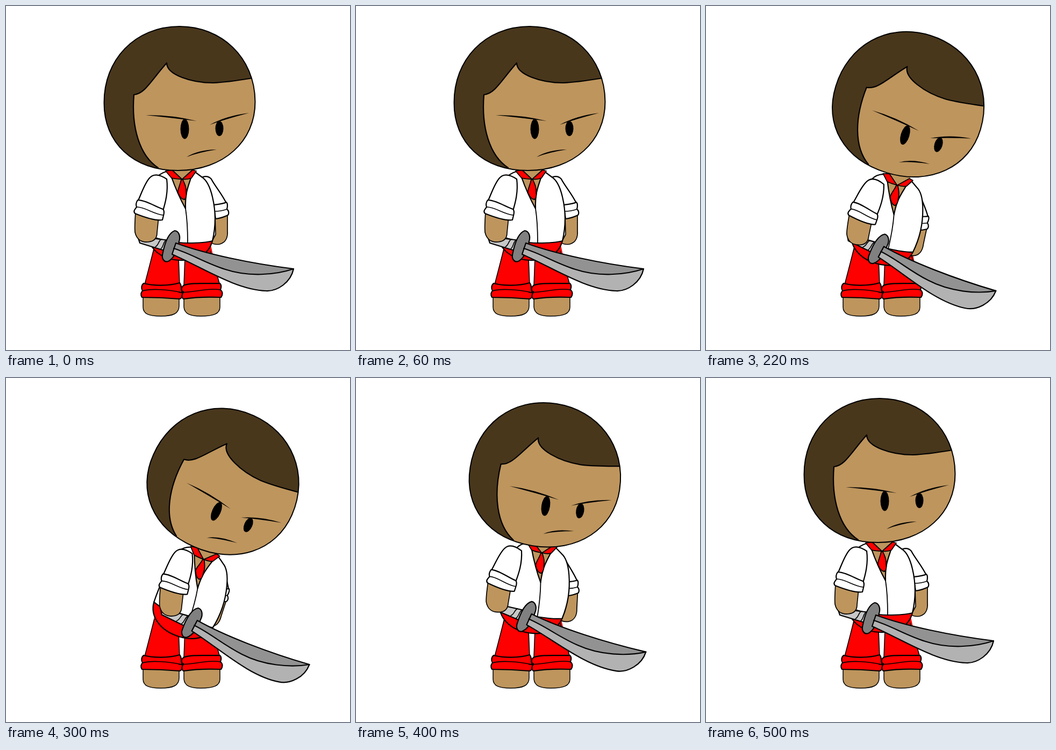
An HTML page with a canvas that plays this animation: 640x640 px, repeating every 0.6 s.

```html
<!DOCTYPE html>
<html lang="en">
<head>
<meta charset="utf-8">
<title>Swordsman idle</title>
<style>
html, body { margin: 0; width: 100%; height: 100%; overflow: hidden; background: #fff; }
canvas { display: block; width: 640px; height: 640px; }
</style>
</head>
<body>
<canvas id="stage" width="640" height="640"></canvas>
<script>
const ctx = document.getElementById('stage').getContext('2d');
const LOOP = 600;
const SKIN = '#be955d', HAIR = '#49371c', RED = '#ff0000', WHITE = '#ffffff', INK = '#000000';

// Joint of each part in the rest pose.
const pivots = {
  head: [332, 229],
  torso: [327, 323],
  nearArm: [266, 380],
  farArm: [412, 377],
  sword: [307, 447]
};

// Where each joint goes, then the turn in degrees.
const rest = {
  head: [332, 229, 0], torso: [327, 323, 0], nearArm: [266, 380, 0],
  farArm: [412, 377, 0], sword: [307, 447, 0]
};
const lean = {
  head: [370, 240, 17], torso: [355, 334, 13], nearArm: [292, 386, 6],
  farArm: [413, 403, 12], sword: [321, 452, 9.2]
};
const bow = {
  head: [391, 248, 24], torso: [367, 338, 18.5], nearArm: [312.5, 384, 1],
  farArm: [413, 404, 18], sword: [346, 455.5, 9.1]
};
const rise = {
  head: [352.5, 238, 9], torso: [345, 326, 9], nearArm: [271, 377, 4],
  farArm: [413, 388, 3], sword: [317, 444, 6]
};

function poseAt(t) {
  if (t < 100 || t >= 500) return rest;
  if (t < 300) return lean;
  return t < 400 ? bow : rise;
}

function fill(d, color) {
  ctx.fillStyle = color;
  ctx.fill(new Path2D(d));
}

function line(d, width = 2.2) {
  ctx.lineWidth = width;
  ctx.stroke(new Path2D(d));
}

function shape(d, color, width) {
  fill(d, color);
  line(d, width);
}

function eye(x, y, rx, ry) {
  ctx.beginPath();
  ctx.ellipse(x, y, rx, ry, 0, 0, Math.PI * 2);
  ctx.fillStyle = INK;
  ctx.fill();
}

// A curved stroke that thins out at both ends.
function taper(x0, y0, cx, cy, x1, y1, w) {
  fill(`M${x0} ${y0} Q${cx} ${cy - w} ${x1} ${y1} Q${cx} ${cy + w} ${x0} ${y0}Z`, INK);
}

function legs() {
  shape('M255 540 L255 560 C255 573 266 577 288 577 C311 577 322 572 322 558 L322 540Z', SKIN, 1.5);
  shape('M331 540 L331 560 C332 573 343 577 362 577 C386 577 398 573 398 560 L398 540Z', SKIN, 1.5);
  fill('M277 440 L258 520 L323 524 L321 465 L333 465 L331 524 L397 518 L380 440Z', RED);
  line('M276 449 L258 518', 1.6);
  line('M321 468 L323 520', 1.6);
  line('M333 468 L331 520', 1.6);
  line('M380 456 L397 516', 1.6);
  shape('M256 516 C275 521 303 521 323 515 C328 521 325 526 327 531 C330 538 327 544 323 545 C300 543 272 542 253 542 C250 537 251 533 254 530 C251 525 252 519 256 516Z', RED);
  line('M254 530 C270 525 306 528 327 533', 1.6);
  shape('M330 520 C345 514 374 517 398 516 C402 520 400 525 399 528 C404 532 403 538 400 542 C378 541 350 542 330 545 C325 541 328 536 330 532 C325 529 326 524 330 520Z', RED);
  line('M322 533 C350 533 378 524 399 528', 1.6);
}

function farArm() {
  shape('M389 392 L390 425 L382 440 C386 444 392 444 398 443 C409 440 413 430 412 418 L412 388Z', SKIN, 1.7);
  fill('M366 318 Q376 315 382 322 L411 370 L387 376Z', WHITE);
  line('M366 318 Q376 315 382 322 C388 334 402 350 410 367');
  shape('M386 370 C395 369 405 368 410 365 C413 368 412 374 411 378 C415 381 415 386 413 389 C405 393 397 395 390 396Z', WHITE);
  line('M411 378 C403 381 396 382 388 382', 1.6);
}

function torso() {
  shape('M265 427 C266 452 290 474 330 473 C355 472 377 464 384 437Z', RED);
  fill('M306 296 L349 296 L347 318 L334 380 L308 318Z', SKIN);
  shape('M298 308 C291 310 284 313 279 322 C270 355 265 390 265 427 C285 434 312 441 338 441 C357 441 373 440 384 437 C391 408 390 380 384 355 C380 338 374 324 364 318 L352 309 L345 317 C339 336 333 347 334 377 C324 359 317 344 307 316Z', WHITE);
  line('M334 377 C337 396 338 418 338 440', 1.8);
  shape('M326 323 C324 334 319 341 320 347 C323 356 328 360 332 360 C336 357 336 352 335 346 C336 335 331 329 329 323Z', RED, 1.8);
  shape('M297 307 L309 305 L327 322 C319 322 312 321 308 320Z', RED, 1.8);
  shape('M354 307 L347 305 L328 322 C336 323 341 322 345 320Z', RED, 1.8);
}

function grip() {
  shape('M245 429 L304 436 L298 456 L249 441Z', '#c8c8c8');
  line('M289 434 C283 437 285 444 278 448', 1.6);
  line('M298 435 C291 441 294 447 288 452', 1.6);
}

function blade() {
  shape('M314 418 C322 419 325 429 322 438 C319 455 312 470 302 475 C294 478 290 470 291 463 C294 447 300 423 314 418Z', '#808080');
  const edge = 'M316 441 C370 461 455 479 535 489';
  const belly = 'C530 514 505 531 484 530 C427 528 365 486 309 462';
  const ridge = 'C500 501 450 504 408 490 C370 478 345 461 312 451';
  fill(`${edge} ${belly}Z`, '#b2b2b2');
  fill(`${edge} ${ridge}Z`, '#929292');
  line(`M535 489 ${ridge}`);
  line(`${edge} ${belly}Z`);
}

function nearArm() {
  shape('M241 384 C240 397 239 410 240 421 C243 434 252 440 264 439 C276 438 281 432 281 422 L284 392Z', SKIN, 1.7);
  const sleeve = 'M243 368 C252 350 257 331 267 320 C274 312 284 312 299 322 C302 345 297 365 291 384';
  fill(sleeve, WHITE);
  line(sleeve);
  shape('M245 361 C260 361 279 374 292 378 C296 382 293 389 291 398 C278 400 255 392 240 386 C236 382 240 378 243 374 C241 369 243 364 245 361Z', WHITE);
  line('M243 374 C257 373 274 387 292 389', 1.6);
}

function head() {
  const skull = 'M323 38 C400 38 463 95 463.5 178 C464 251 405 306 320 306 C236 306 182 254 182.5 180 C182 101 239 38 323 38Z';
  const hairline = 'M283 301 C248 278 233 225 238 165 C258 164 271 137 299 106 C299 128 345 143 385 143 C412 142 435 138 459 134';
  fill(skull, HAIR);
  ctx.save();
  ctx.clip(new Path2D(skull));
  fill(`${hairline} L480 134 L480 320 L283 320Z`, SKIN);
  line(hairline);
  ctx.restore();
  line(skull, 2);

  eye(332.5, 229, 8, 18.5);
  eye(397, 228, 7.5, 14);
  taper(260, 203, 308, 205, 355, 214, 3);
  taper(379, 221, 410, 207, 452, 199, 3);
  taper(336, 281, 357, 270, 392, 267, 2.6);
}

function place(pose, part, paint) {
  const [x, y, deg] = pose[part];
  const [px, py] = pivots[part];
  ctx.save();
  ctx.translate(x, y);
  ctx.rotate(deg * Math.PI / 180);
  ctx.translate(-px, -py);
  paint();
  ctx.restore();
}

function draw(pose) {
  ctx.fillStyle = WHITE;
  ctx.fillRect(0, 0, 640, 640);
  ctx.strokeStyle = INK;
  ctx.lineCap = ctx.lineJoin = 'round';
  legs();
  place(pose, 'farArm', farArm);
  place(pose, 'torso', torso);
  place(pose, 'sword', grip);
  place(pose, 'nearArm', nearArm);
  place(pose, 'sword', blade);
  place(pose, 'head', head);
}

const start = performance.now();
function tick() {
  draw(poseAt((performance.now() - start) % LOOP));
  requestAnimationFrame(tick);
}
tick();
</script>
</body>
</html>
```
